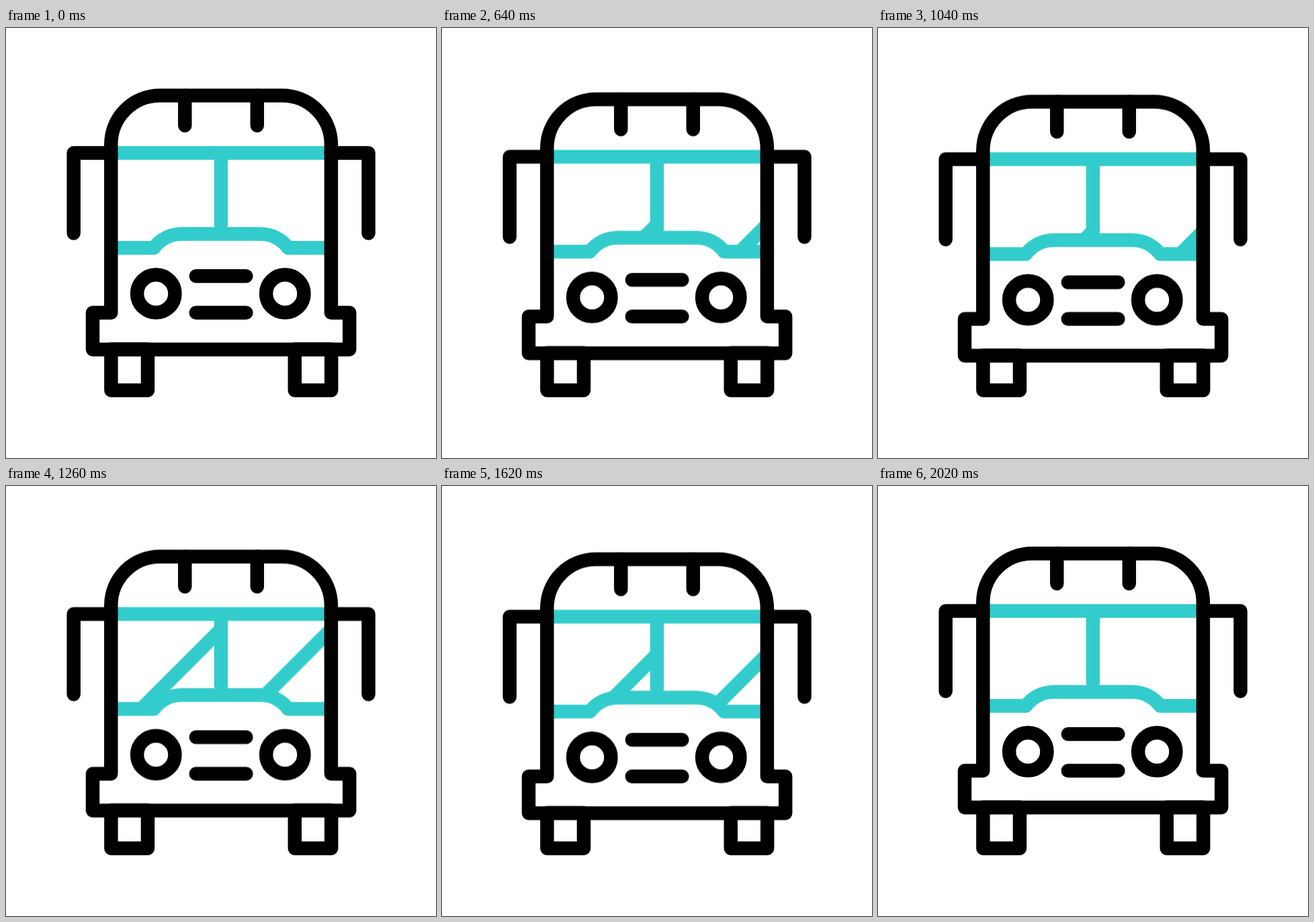
Write an HTML page that moves like this. It is 640 px wide and 640 px high and loops after 2.4 s.

```html
<!DOCTYPE html>
<html lang="en">
<head>
<meta charset="utf-8">
<title>Bus</title>
<style>
  html, body { margin: 0; width: 100%; height: 100%; overflow: hidden; background: #fff; }
  svg { display: block; width: 100vw; height: 100vh; }
  path, circle {
    fill: none; stroke: #000; stroke-width: 20.48;
    stroke-linecap: round; stroke-linejoin: round;
  }
  .teal path { stroke: #33cccc; }
  .wheels path { stroke-linecap: butt; }
  clipPath path { stroke: none; }

  .bus, .shine {
    animation: bounce 2400ms cubic-bezier(.333, 0, .667, 1) infinite;
  }
  .shine { animation-name: sweep; }

  /* three bounces between 200 ms and 2000 ms */
  @keyframes bounce {
    0%, 8.3333%, 33.3333%, 58.3333%, 83.3333%, 100% { transform: translateY(0); }
    20.8333%, 45.8333%, 70.8333% { transform: translateY(10.24px); }
  }
  /* out in 360 ms, back in 240 ms, once per bounce */
  @keyframes sweep {
    0%, 8.3333%, 33.3333%, 58.3333%, 83.3333%, 100% { transform: translateX(280.5px); }
    23.3333%, 48.3333%, 73.3333% { transform: translateX(947.5px); }
  }
</style>
</head>
<body>
<svg viewBox="0 0 640 640">
  <defs>
    <clipPath id="left">
      <path d="M156 186H320V306.4H262C245 306.4 230 314 220 327.3H156Z"/>
    </clipPath>
    <clipPath id="right">
      <path d="M484 186H320V306.4H378C395 306.4 410 314 420 327.3H484Z"/>
    </clipPath>
  </defs>

  <g class="wheels">
    <path d="M156.4 483V539.3H211V483"/>
    <path d="M429.8 483V539.3H484.2V483"/>
  </g>

  <g class="bus">
    <g class="teal">
      <g clip-path="url(#left)"><path class="shine" d="M-304 140L-534 370"/></g>
      <g clip-path="url(#right)"><path class="shine" d="M-140 140L-370 370"/></g>
      <path d="M156 186H484M320 186V292.5"/>
      <path d="M156 327.3H220C230 314 245 306.4 262 306.4H378C395 306.4 410 314 420 327.3H484"/>
    </g>

    <path d="M156.3 186H100.7V305.5M483.9 186H539.5V305.5"/>
    <path d="M266.3 100.5V145.2M373.8 100.5V145.2"/>
    <path d="M156.3 423.7V173A72.7 72.7 0 0 1 229 100.4H411.2A72.7 72.7 0 0 1 483.9 173V423.7H511.2V478.4H129V423.7Z"/>
    <path d="M156.4 477.9H211M429.8 477.9H484.2"/>

    <circle cx="223.3" cy="395.4" r="28.2"/>
    <circle cx="415.3" cy="395.4" r="28.2"/>
    <path d="M282.8 369.2H357.4M282.8 423.8H357.4"/>
  </g>
</svg>
</body>
</html>
```
